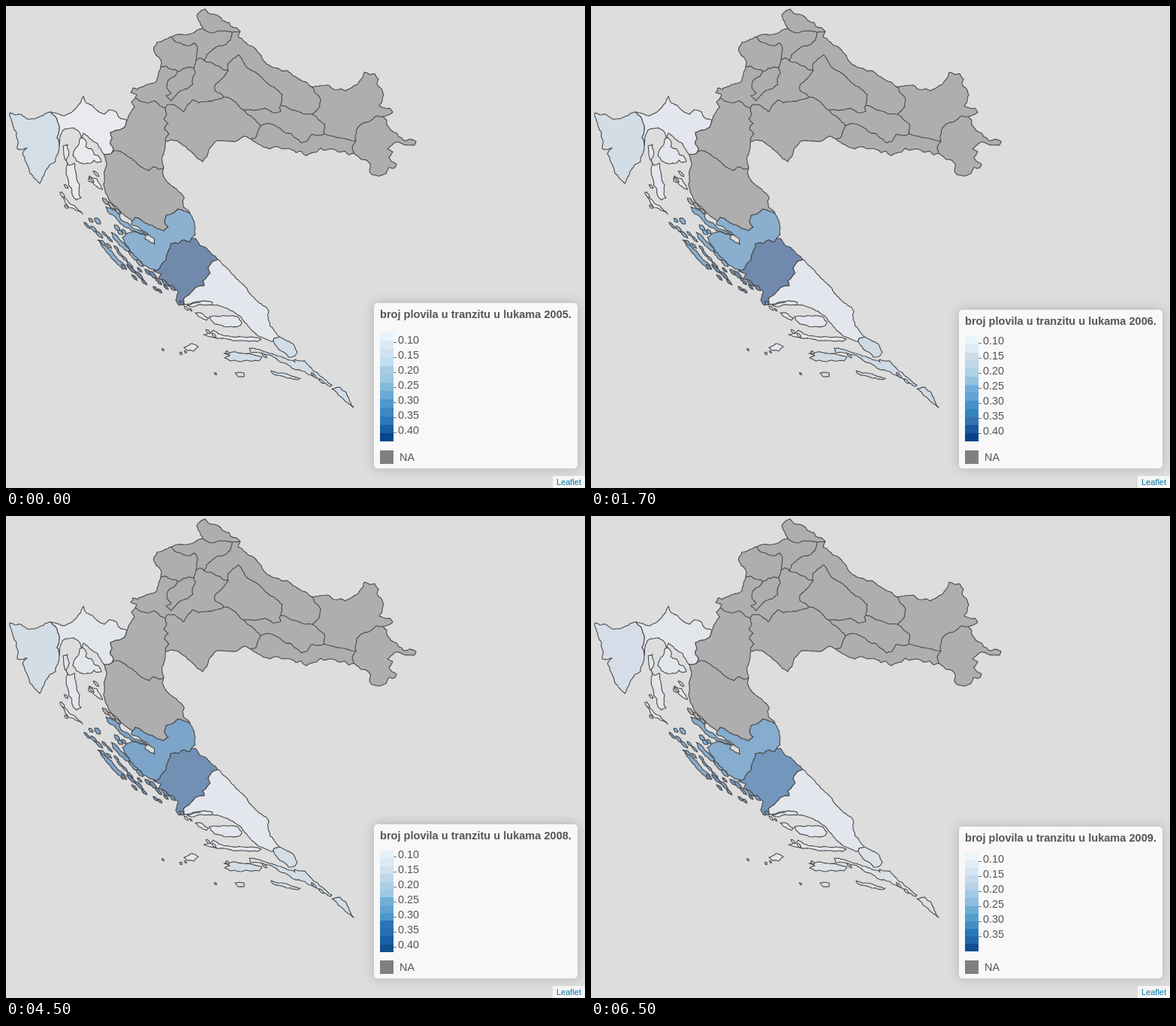
Animation of 771 by 641 pixels, one loop 8000 ms. Source, as an HTML page:

```html
<!DOCTYPE html>
<html lang="hr">
<head>
<meta charset="utf-8">
<title>Karta županija</title>
<style>
html, body { margin: 0; width: 100%; height: 100%; overflow: hidden; background: #ddd; }
svg { display: block; width: 771px; height: 641px; font-family: "Liberation Sans", Arial, sans-serif; }
path { stroke: #484848; stroke-width: 1.1; stroke-linejoin: round; }
.box { fill: #f8f8f8; filter: drop-shadow(0 0 7.5px rgba(0, 0, 0, .2)); }
text { fill: #555; font-size: 14.4px; }
.title { font-size: 14.57px; font-weight: bold; }
.credit { font-size: 11px; fill: #0078a8; }
</style>
</head>
<body>
<svg id="stage" viewBox="0 0 771 641">
  <g id="map"></g>
  <rect id="box" class="box" x="490" width="271" rx="5"/>
  <g id="legend"></g>
  <rect x="498" y="591" width="18" height="18" fill="#808080"/>
  <text x="524" y="605">NA</text>
  <rect x="728" y="625" width="43" height="16" fill="#f5f5f5"/>
  <text class="credit" x="733" y="637">Leaflet</text>
</svg>
<script>
const $ = id => document.getElementById(id);
const map = $("map"), legend = $("legend"), box = $("box");

function add(parent, tag, attrs, text) {
  const el = document.createElementNS("http://www.w3.org/2000/svg", tag);
  for (const k in attrs) el.setAttribute(k, attrs[k]);
  if (text) el.textContent = text;
  parent.append(el);
  return el;
}

const noise = (x, y) => {
  const v = Math.sin(x * 12.9898 + y * 78.233) * 43758.5453;
  return v - Math.floor(v) - 0.5;
};

// Roughens an edge; depends on place only, so shared borders agree.
function jag(a, b, out) {
  const len = Math.hypot(b[0] - a[0], b[1] - a[1]);
  if (len > 3.5) {
    const x = (a[0] + b[0]) / 2, y = (a[1] + b[1]) / 2, s = Math.min(len * 0.22, 2.6);
    const m = [x + noise(x, y) * s, y + noise(y, x) * s];
    jag(a, m, out);
    jag(m, b, out);
  } else out.push(b);
}

function outline(points, closed) {
  const out = [points[0]];
  const all = closed ? [...points, points[0]] : points;
  for (let i = 1; i < all.length; i++) jag(all[i - 1], all[i], out);
  return "M" + out.map(p => p.map(v => v.toFixed(1))).join("L") + (closed ? "Z" : "");
}

const parse = s => s.trim().split(/\s+/).map(p => p.split(",").map(Number));
const areas = {};

function area(key, points) {
  const el = add(map, "path", { d: outline(points, true), fill: "#aeaeae" });
  (areas[key] ||= []).push(el);
}
const shape = (key, s) => area(key, parse(s));
const border = s => add(map, "path", { d: outline(parse(s)), fill: "none" });

// Slim islets lying north-west to south-east: x,y,length,width
function islets(key, s) {
  for (const [x, y, len, w] of parse(s)) {
    const c = 0.7, at = (u, v) => [x + (u - v) * c, y + (u + v) * c];
    area(key, [at(-len / 2, 0), at(-len / 5, -w / 2), at(len / 4, -w / 2.5),
      at(len / 2, 0), at(len / 6, w / 2), at(-len / 4, w / 2.5)]);
  }
}

const north = `254,13 258,8 265,4 269,9 277,11 284,14 288,19 297,22 299,27 307,29 312,34 309,41
  317,47 326,53 334,59 340,66 344,74 351,79 357,82 375,86 383,93 390,97 399,101 406,107 418,106
  428,105 437,111 445,110 452,113 461,108 468,104 473,97 477,88 484,91 491,90 496,97 494,104
  499,109 503,118 501,124 497,133 505,136 511,136 515,141 509,145 502,147`;
const east = `507,152 507,158 512,165 520,169 523,174 530,179 537,177 546,180 544,185 536,185
  527,183 520,181 514,185 508,190 515,194 510,201 514,207 520,210 518,215 509,215 506,223 498,226
  487,224 484,218 485,210 480,205 473,204 467,199 463,196`;
const south = `456,198 451,193 442,194 432,190 424,192 419,189 414,194 405,196 400,199 393,193
  386,195 378,190 368,190 360,187 352,190 344,188 337,184 330,180 326,177 317,173 308,179 298,180
  287,179 279,180 273,187 270,191 267,201 262,207 255,203 249,196 243,191 237,186 233,183 227,179
  221,178 213,180 212,188 211,193 208,200 208,208 210,215`;
const west = `208,222 211,229 217,236 222,240 227,243 233,249 237,254 235,260 237,268 243,272 245,276
  238,273 229,270 222,276 213,279 211,287 216,294 210,299 200,296 190,291 180,285 172,281 168,286
  160,280 153,274 147,267 140,262 136,255 132,247 130,238 131,230 131,220 134,210 132,202 130,197
  140,196 143,190 139,184 141,176 139,168 150,165 158,161 161,152`;
const rise = `163,146 167,140 171,134 167,128 172,122 174,118 166,115 169,109 175,111 185,106 195,103
  201,99 203,90 206,81 206,72 200,66 197,60 197,55 201,48 209,46 220,41 227,38 240,38 249,36 257,31
  262,30 258,21`;
area("na", [north, east, south, west, rise].flatMap(parse));

[
  "262,30 268,34 278,35 290,33 301,35 312,34",
  "220,41 225,47 235,51 245,53 251,49 255,56 254,65 253,72",
  "206,81 213,80 220,84 229,87 236,83 244,81 250,82 253,72",
  "253,72 258,69 264,73 267,65 275,58 285,53 293,51 299,45 301,37 301,35",
  "264,73 275,76 284,80 290,85 296,86 296,76 302,70 310,65 315,73 320,81 332,88 342,97 352,106 362,112 368,118 366,132",
  "229,87 226,92 216,99 214,109 220,116 213,119 220,126 227,118 234,112 242,110 249,104 248,97 252,90 250,82",
  "296,86 289,95 279,104 278,112 288,118 290,121",
  "215,131 223,131 230,136 236,141 242,131 248,125 256,129 268,127 278,125 290,121",
  "172,122 180,127 190,129 198,126 205,133 212,136 215,131",
  "212,136 214,143 210,150 216,156 211,164 217,170 212,178 213,180",
  "290,121 300,124 308,131 316,138 326,146 333,153 339,159 335,168 331,176 326,177",
  "316,138 330,139 345,136 355,142 366,140 364,135 366,132",
  "339,159 348,156 360,160 368,166 380,170 388,177 394,182 401,180 406,171 415,172 424,170",
  "366,132 375,135 385,139 395,143 408,144 417,152 424,157 423,167 424,170",
  "406,107 413,117 419,124 417,135 408,144",
  "424,170 433,173 440,175 450,176 460,179 466,180",
  "502,147 494,146 489,150 483,154 473,157 467,164 465,172 466,180 461,187 463,196",
  "140,196 144,193 152,193 160,198 168,203 175,210 182,215 190,219 196,214 203,217 210,215"
].forEach(border);

shape("ist", `5,142 12,145 20,144 28,150 38,150 45,147 52,143 60,141 66,147 69,155 71,165 68,175 71,185
  70,193 66,207 58,211 52,220 48,229 45,236 40,231 34,224 30,215 25,205 22,196 28,189 15,190 16,180
  14,168 9,158 7,150`);
shape("pri", `60,141 69,143 77,146 84,143 92,137 99,129 103,120 107,129 115,132 124,141 131,144 137,138
  147,141 153,150 161,152 158,161 150,165 139,168 141,176 139,184 143,190 140,196 130,197 126,190
  122,183 114,178 107,172 103,169 101,177 98,168 90,162 80,163 75,166 72,174 71,185 68,175 71,165
  69,155 66,147`);
shape("pri", `92,190 97,184 98,177 102,175 107,181 106,187 114,190 117,197 123,199 127,207 121,208
  117,205 113,209 103,210 94,206 89,199`);
shape("pri", `76,186 82,184 84,196 80,205 84,212 91,209 93,220 94,230 98,238 97,250 100,255 94,258
  88,250 86,241 83,232 80,222 82,210 77,198`);
shape("pri", "74,247 78,255 84,262 92,266 97,272 102,277 94,272 84,268 79,262 75,254");
shape("pri", "111,226 116,229 121,230 126,238 129,244 121,240 116,235 110,233");
islets("pri", "120,223,11,3 75,251,9,4 80,240,7,3 80,267,6,3 114,231,9,3");

shape("zad", `168,286 172,281 180,285 190,291 200,296 210,299 216,294 211,287 213,279 222,276 229,270
  238,273 245,276 250,285 252,295 252,304 247,309 244,314 237,311 229,316 219,316 216,326 213,338
  207,344 205,349 200,352 192,350 184,345 174,337 165,325 158,315 155,308 162,302 170,300 178,303
  186,305 185,310 192,314 198,317 197,309 190,304 180,298 167,290`);
shape("zad", "122,311 128,313 140,325 150,338 160,349 155,350 143,338 132,325");
shape("zad", "133,267 141,270 150,276 153,284 161,288 170,296 184,301 189,305 178,302 168,299 158,294 148,284 139,277");
shape("zad", "140,301 147,305 156,315 165,325 161,326 151,318 143,309");
islets("zad", `113,285,8,4 122,286,11,6 148,295,11,5 108,292,12,3 117,297,12,4 124,304,14,4
  131,303,9,3 138,310,11,3 152,301,9,5 157,300,8,4 170,333,20,5 178,342,13,5 152,330,12,3 158,336,10,3
  137,319,10,3 165,344,12,3 147,322,9,3 157,347,10,3 129,315,9,4`);
islets("na", "133,260,13,5 141,266,14,5 149,273,11,4");

shape("sib", `247,309 252,309 258,318 267,322 274,330 282,337 275,340 269,349 272,355 262,366 264,372
  253,374 242,385 236,390 237,397 231,398 226,391 229,379 219,373 212,366 203,362 207,356 196,352
  200,352 205,349 207,344 213,338 216,326 219,316 229,316 237,311 244,314`);
islets("sib", `167,350,18,4 177,358,17,4 184,367,11,3 171,361,11,3 189,354,12,4 196,358,15,5
  203,366,13,4 212,368,14,4 222,375,10,4 199,376,9,3 205,379,8,3 213,374,9,3 178,351,9,3 234,395,8,4`);

shape("spl", `282,337 290,345 299,354 306,362 315,370 324,382 336,394 346,400 350,407 349,417 352,426
  358,433 364,440 357,442 356,446 346,443 336,439 326,430 318,421 309,411 299,405 288,400 278,398
  270,395 256,393 246,396 237,397 236,390 242,385 253,374 264,372 262,366 272,355 269,349 275,340`);
shape("spl", "241,398 252,395 262,392 275,394 273,398 260,397 250,400");
shape("spl", "252,408 259,408 264,412 270,415 267,418 259,414");
shape("spl", "271,413 284,413 297,412 308,413 314,420 312,425 302,427 288,425 278,423");
shape("spl", "263,437 272,435 276,431 283,436 297,439 315,440 340,443 335,446 318,445 300,444 285,442 272,440");
shape("spl", "237,454 246,449 256,453 250,459 240,457");
islets("spl", "233,462,4,3 209,457,4,2 240,402,8,3 246,404,5,2 269,433,8,3 277,438,8,3 239,460,4,2");

shape("dub", "356,446 357,442 364,440 372,444 382,449 388,460 385,465 376,467 367,459 360,452");
shape("dub", `324,455 340,458 352,462 366,466 378,471 385,474 384,470 398,472 405,480 415,488 425,497
  434,504 432,506 420,499 408,492 398,486 386,484 374,476 362,471 350,464 338,461 326,461`);
shape("dub", "434,509 445,507 453,514 457,524 463,534 452,526 442,517");
shape("dub", "290,462 302,460 316,462 330,464 341,467 337,472 320,471 300,472 291,468 298,465");
shape("dub", "305,488 317,488 317,493 309,493");
shape("dub", "353,485 365,488 380,492 392,495 388,497 370,493 355,489");
islets("dub", "279,489,4,2 410,491,10,3 420,499,9,3 295,461,6,3 344,465,9,3");

// start, box top, bar top, bar bottom, first label baseline, label count
const keys = ["ist", "pri", "zad", "sib", "spl", "dub"];
const scenes = [
  { year: 2005, at: 0, top: 395, bar: [434, 579], label: 449, count: 7,
    fills: "d3dee7 e9eaed 8cb0d0 7189ab e3e7ed d0dce7",
    ramp: "e8f4fa dce9f5 d0e2f1 c0e0f2 a9cce2 9ac8e0 83badb 69a9d8 4f98cd 3c88c3 2d79b8 1b61a6 08468b" },
  { year: 2006, at: 500, top: 404, bar: [439, 579], label: 450, count: 7,
    fills: "d2dde6 e3e6ec 8aafce 7089ad e3e6ec cfdae5",
    ramp: "e8f5fa dcebf5 cddbea bfd7e7 acd0e4 92c3de 74addb 62a2d4 4492c8 3583bd 3672b2 1b579f 08438a" },
  { year: 2007, at: 2500, top: 402, bar: [437, 580], label: 446, count: 7,
    fills: "cedae6 e2e7eb 86abcd 7186aa e1e7ea d2dce7",
    ramp: "e6f4f7 dce6f2 cddcec bfd4e8 a5d1e8 93c6e1 75b0d7 5699c9 4290c7 2f7fbd 206eb2 1059a2 093b7b" },
  { year: 2008, at: 4500, top: 410, bar: [445, 580], label: 455, count: 7,
    fills: "d3dde6 e2e6eb 7da4c9 7190b4 e3e6ec d2dde6",
    ramp: "e7f1f8 dde9f4 cfe0ef c1d8e9 accfe6 9ec9e3 73aed7 62a5d2 4e97c8 2e74b6 256eb3 1a60a8 11508f" },
  { year: 2009, at: 6500, top: 413, bar: [448, 579], label: 461, count: 6,
    fills: "d6dde8 e2e6eb 86acce 7396bd e3e6ed dae1e7",
    ramp: "ebf4fb e1edf7 d6e5f3 c6daeb b5d2e7 9fcae5 8bbde0 6baed6 559fce 438fc4 2b78b7 1f68ad 144f94" }
];

function show(scene) {
  scene.fills.split(" ").forEach((c, i) =>
    areas[keys[i]].forEach(el => el.setAttribute("fill", "#" + c)));
  box.setAttribute("y", scene.top);
  box.setAttribute("height", 615 - scene.top);
  legend.replaceChildren();
  add(legend, "text", { class: "title", x: 498, y: scene.top + 20 },
    `broj plovila u tranzitu u lukama ${scene.year}.`);
  const [y0, y1] = scene.bar, ramp = scene.ramp.split(" ");
  const edge = i => Math.round(y0 + (y1 - y0) * i / ramp.length);
  ramp.forEach((c, i) => add(legend, "rect",
    { x: 498, y: edge(i), width: 18, height: edge(i + 1) - edge(i), fill: "#" + c }));
  for (let i = 0; i < scene.count; i++) {
    const y = scene.label + 20 * i;
    add(legend, "rect", { x: 516, y: y - 2, width: 4, height: 1, fill: "#777" });
    add(legend, "text", { x: 522, y }, (0.1 + 0.05 * i).toFixed(2));
  }
}

let current;
function tick() {
  const t = performance.now() % 8000;
  const scene = scenes.findLast(s => t >= s.at);
  if (scene !== current) show(current = scene);
  requestAnimationFrame(tick);
}
tick();
</script>
</body>
</html>
```
